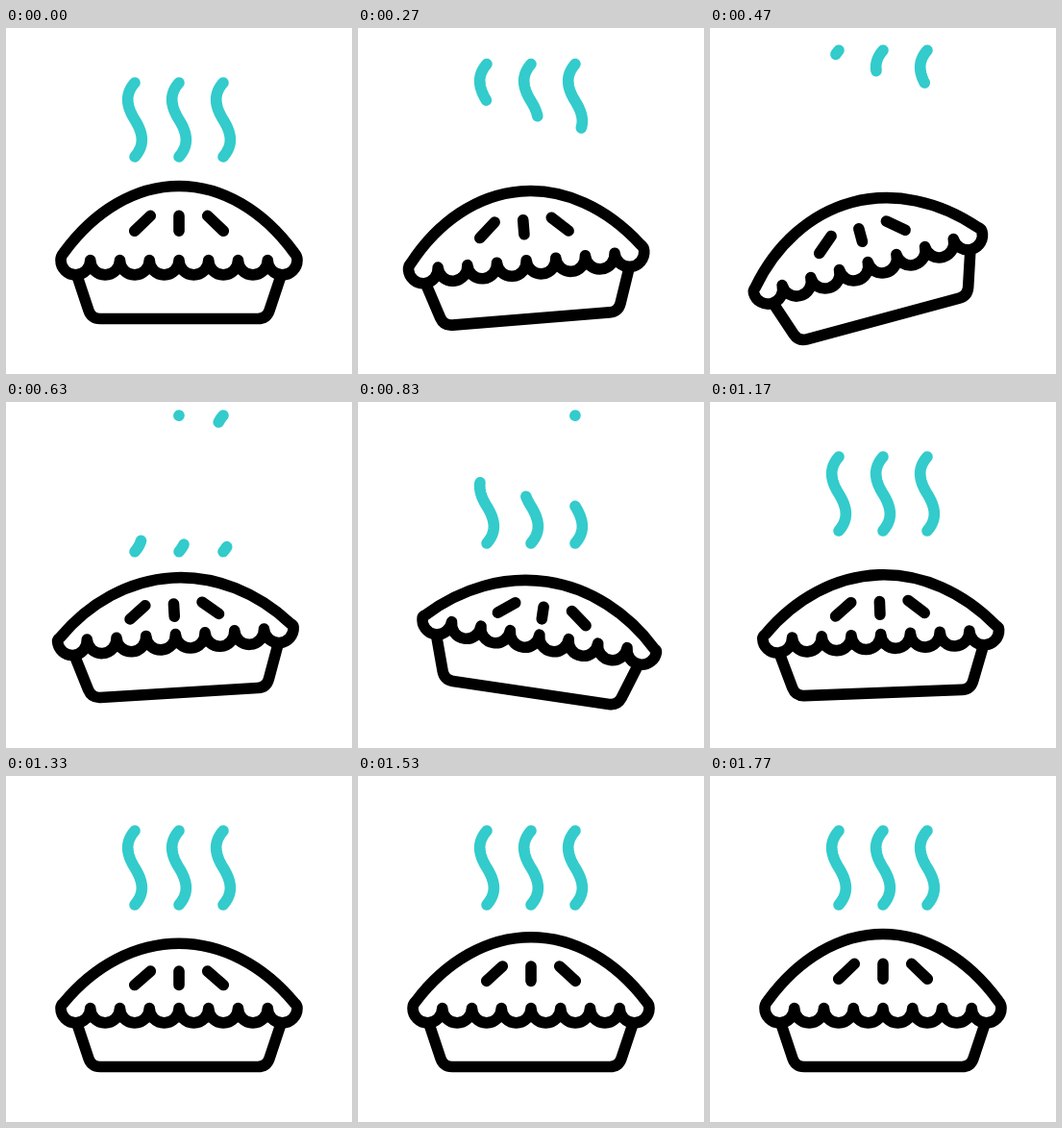
An HTML page with a canvas that plays this animation: 360 px wide and 360 px high, repeating every 2000 ms.

```html
<!DOCTYPE html>
<html lang="en">
<head>
<meta charset="utf-8">
<title>Hot pie</title>
<style>
html, body { margin: 0; width: 100%; height: 100%; overflow: hidden; background: #fff; }
canvas { display: block; width: 360px; height: 360px; }
</style>
</head>
<body>
<canvas id="stage"></canvas>
<script>
const LOOP = 2000;
const SIZE = 360;
const canvas = document.getElementById('stage');
const ctx = canvas.getContext('2d');
const dpr = window.devicePixelRatio || 1;
canvas.width = canvas.height = SIZE * dpr;

const clamp = v => Math.min(1, Math.max(0, v));
const mix = (a, b, k) => a + (b - a) * k;
const part = (t, from, to) => clamp((t - from) / (to - from));
const ease = k => (1 - Math.cos(Math.PI * k)) / 2;

// Eased value from [time, value] keys
function track(keys, t) {
  for (let i = 1; i < keys.length; i++) {
    const [t0, a] = keys[i - 1], [t1, b] = keys[i];
    if (t < t1) return mix(a, b, ease(part(t, t0, t1)));
  }
  return keys[keys.length - 1][1];
}

const TILT = [[133, 0], [508, -15.5], [766, 10.5], [1033, -4.6], [1300, 0]];
const SQUASH = [[0, 0], [840, 21.3], [1770, 0]];

const PLUMES = [
  { x: 134, erase: [30, 500], gone: 600, grow: [583, 888] },
  { x: 180, erase: [132, 602], gone: 733, grow: [590, 968] },
  { x: 226, erase: [200, 680], gone: 867, grow: [596, 1064] }
];

const bezier = (a, b, c, d, k) => {
  const m = 1 - k;
  return m * m * m * a + 3 * m * m * k * b + 3 * m * k * k * c + k * k * k * d;
};

// S-shaped wisp, point-symmetric about its middle, with running length
const wisp = [];
const STEPS = 40;
for (let i = 0; i <= STEPS; i++) {
  const k = i / STEPS;
  wisp.push([bezier(0, -10.5, -9, 0, k), bezier(57, 69, 81, 95.5, k)]);
}
for (let i = STEPS - 1; i >= 0; i--) wisp.push([-wisp[i][0], 191 - wisp[i][1]]);
const dist = [0];
for (let i = 1; i < wisp.length; i++) {
  dist.push(dist[i - 1] + Math.hypot(wisp[i][0] - wisp[i - 1][0], wisp[i][1] - wisp[i - 1][1]));
}
const total = dist[dist.length - 1];

function wispAt(k) {
  const d = k * total;
  let i = 1;
  while (i < dist.length - 1 && dist[i] < d) i++;
  const f = part(d, dist[i - 1], dist[i]);
  return [mix(wisp[i - 1][0], wisp[i][0], f), mix(wisp[i - 1][1], wisp[i][1], f)];
}

function drawWisp(x, dy, from, to) {
  const place = ([px, py]) => ctx.lineTo(x + px, py + dy);
  ctx.beginPath();
  place(wispAt(from));
  wisp.forEach((p, i) => {
    const k = dist[i] / total;
    if (k > from && k < to) place(p);
  });
  place(wispAt(to));
  ctx.stroke();
}

function drawSteam(t) {
  ctx.strokeStyle = '#33cbcb';
  const rise = -43 * part(t, 0, 600);
  const settle = 23.5 * (1 - part(t, 590, 1130));
  for (const { x, erase, gone, grow } of PLUMES) {
    if (t < gone) drawWisp(x, rise, 0, Math.max(0.003, 1 - part(t, ...erase)));
    if (t > grow[0]) drawWisp(x, settle, Math.min(0.997, 1 - part(t, ...grow)), 1);
  }
}

function drawCrust(drop) {
  const top = 164.5 + drop, handle = 190 + drop * 0.75;
  const rim = 234 + drop * 0.2;
  const r = 15.375, y = 241.5;
  const tip = mix(rim, y, 0.45);
  ctx.beginPath();
  ctx.moveTo(57, y);
  ctx.quadraticCurveTo(57, tip, 60, rim);
  ctx.bezierCurveTo(92, handle, 135, top, 180, top);
  ctx.bezierCurveTo(225, top, 268, handle, 300, rim);
  ctx.quadraticCurveTo(303, tip, 303, y);
  for (let i = 7; i >= 0; i--) ctx.arc(57 + r * (2 * i + 1), y, r, 0, Math.PI);
  ctx.closePath();
  ctx.stroke();
}

function drawSlits(drop) {
  const y = 203.3 + drop * 0.72;
  const h = 7.9 * (1 - drop * 0.009);
  ctx.beginPath();
  for (const [x, lean] of [[142, -8.3], [180, 0], [218, 8.3]]) {
    ctx.moveTo(x - lean, y - h);
    ctx.lineTo(x + lean, y + h);
  }
  ctx.stroke();
}

function drawDish() {
  ctx.beginPath();
  ctx.moveTo(75, 261);
  ctx.lineTo(86, 294);
  ctx.quadraticCurveTo(89, 302.5, 98, 302.5);
  ctx.lineTo(262, 302.5);
  ctx.quadraticCurveTo(271, 302.5, 274, 294);
  ctx.lineTo(285, 261);
  ctx.stroke();
}

function drawPie(t) {
  const drop = track(SQUASH, t);
  ctx.save();
  ctx.translate(180, 302);
  ctx.rotate(track(TILT, t) * Math.PI / 180);
  ctx.translate(-180, -302);
  ctx.strokeStyle = '#000';
  drawDish();
  drawCrust(drop);
  drawSlits(drop);
  ctx.restore();
}

function draw(t) {
  ctx.setTransform(dpr, 0, 0, dpr, 0, 0);
  ctx.fillStyle = '#fff';
  ctx.fillRect(0, 0, SIZE, SIZE);
  ctx.lineWidth = 11.6;
  ctx.lineCap = ctx.lineJoin = 'round';
  drawSteam(t);
  drawPie(t);
}

const start = performance.now();
function tick() {
  draw((performance.now() - start) % LOOP);
  requestAnimationFrame(tick);
}
tick();
</script>
</body>
</html>
```
